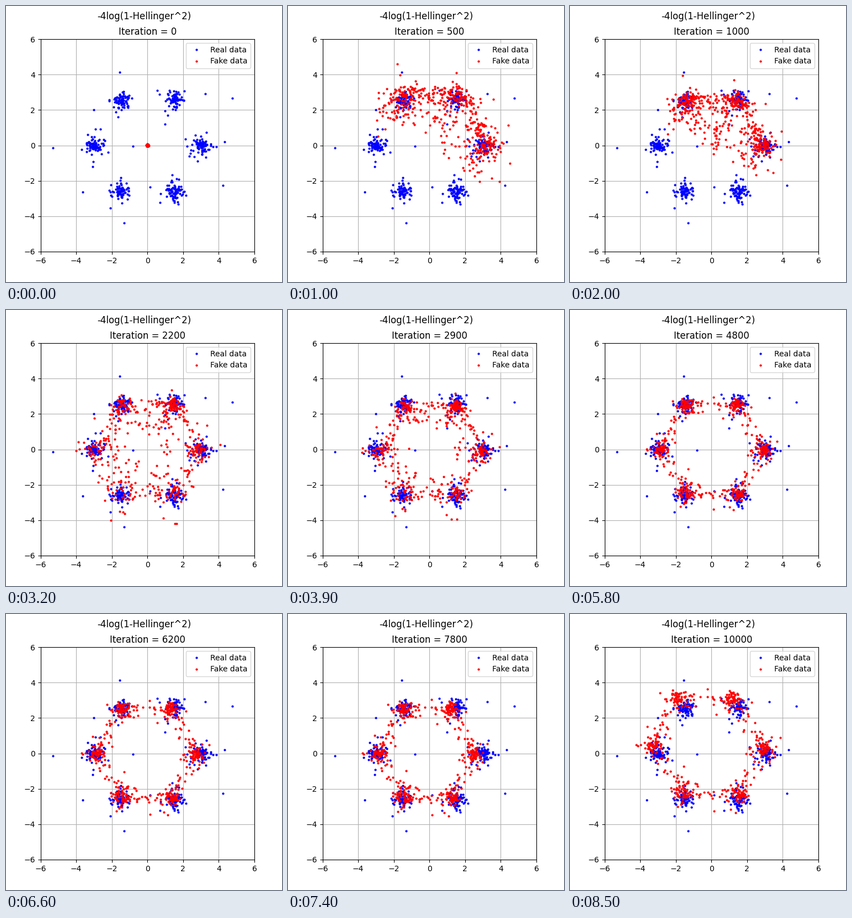
A matplotlib script for the animation above (8600 ms loop, 500 by 500 pixels).

```python
import numpy as np
import matplotlib.pyplot as plt
from matplotlib.animation import FuncAnimation

FRAMES, INTERVAL = 86, 100
RADIUS, MODES = 3, 6
HALF = 180 / MODES          # half the angle between neighbouring modes
N_FAKE = 500

rng = np.random.default_rng(12)

# Real data: six heavy-tailed clusters on a ring and a few far strays
STRAYS = [(-5.3, -0.14), (4.76, 2.67), (4.33, 0.2), (4.24, -2.26), (-1.56, 4.13),
          (-1.31, -4.38), (3.24, 2.91), (-3.63, -2.63), (-1.65, 1.61), (0.15, -2.35),
          (-0.81, -0.05), (0.98, 1.2), (-3.07, -1.2), (-3.01, 2.01)]


def polar(r, degrees):
    a = np.radians(degrees)
    return np.column_stack([r * np.cos(a), r * np.sin(a)])


def heavy(shape, limit):
    """Noise with long tails, softly held below the limit."""
    return limit * np.tanh(rng.standard_t(3, shape) / limit)


centers = polar(RADIUS, np.arange(MODES) * 2 * HALF)
real = np.vstack([c + 0.21 * heavy((78, 2), 4.5) for c in centers] + [STRAYS])

# Fixed latent values of the fake points
along = np.linspace(-1, 1, N_FAKE)
noise = heavy((N_FAKE, 2), 7)
pull = rng.random(N_FAKE) ** 6

# Course of each quantity: (frames, values), linear in between
COURSE = {
    "scale": ([0, 4, 9, 20], [0, 0.5, 1.15, 1]),
    "span": ([0, 4, 9, 20, 26, 32], [60, 80, 88, 88, 150, 180]),
    "skew": ([20, 32, 58], [1, 1.3, 1]),
    "gather": ([0, 9, 20, 32, 46, 58], [1.2, 1.5, 2.2, 2.8, 4, 4.5]),
    "spread": ([0, 4, 9, 20, 32, 58, 74], [0.012, 0.15, 0.24, 0.2, 0.14, 0.13, 0.16]),
    "fray": ([4, 9, 20, 26, 32, 46, 58, 85], [0, 0.6, 0.5, 2.5, 2.2, 1, 0.5, 0.2]),
    "inner": ([0, 20, 32, 46], [0.4, 1, 0.7, 0.25]),
    "drift": ([32, 46, 58, 74, 85], [0, -0.4, 0, 0, 1]),
    "squeeze": ([58, 74, 85], [0, 0.15, 0]),
}


def fake_points(i):
    c = {name: np.interp(i, *course) for name, course in COURSE.items()}

    # Two arms grow around the ring from the upper right
    angle = 60 + c["span"] * np.sign(along) * np.abs(along) ** c["skew"]

    # Gather the angles around the modes; the rest form straight bridges
    mode = 2 * HALF * np.round(angle / (2 * HALF))
    off = (angle - mode) / HALF
    off = HALF * np.sign(off) * np.abs(off) ** c["gather"]
    chord = np.cos(np.radians(HALF)) / np.cos(np.radians(HALF - np.abs(off)))
    r = RADIUS * c["scale"] * chord * (1 - c["inner"] * pull)

    # The far ends of the arms are looser
    spread = c["spread"] * (1 + c["fray"] * along ** 2)
    x, y = (polar(r, mode + off) + noise * spread[:, None]).T

    dx = c["drift"] * (-0.2 + 0.08 * x - 0.06 * y) - c["squeeze"] * np.maximum(x, 0)
    dy = c["drift"] * (0.4 - 0.02 * x + 0.07 * y)
    return x + dx, y + dy


def iteration(i):
    """Steps of 50, then 100, then 200."""
    return 50 * i + 50 * max(i - 20, 0) + 100 * max(i - 60, 0)


plt.rcParams["font.family"] = "DejaVu Sans"
fig, ax = plt.subplots(figsize=(5, 5), dpi=100)
fig.suptitle("-4log(1-Hellinger^2)")
ax.plot(*real.T, "b.", markersize=4, label="Real data")
fake, = ax.plot([], [], "r.", markersize=4, label="Fake data")
title = ax.set_title("Iteration = 0")
ax.set(xlim=(-6, 6), ylim=(-6, 6))
ax.grid(True)
ax.legend(loc="upper right")


def update(i):
    fake.set_data(*fake_points(i))
    title.set_text(f"Iteration = {iteration(i)}")
    return fake, title


anim = FuncAnimation(fig, update, frames=FRAMES, interval=INTERVAL, repeat=True, blit=False)
plt.show()
```
